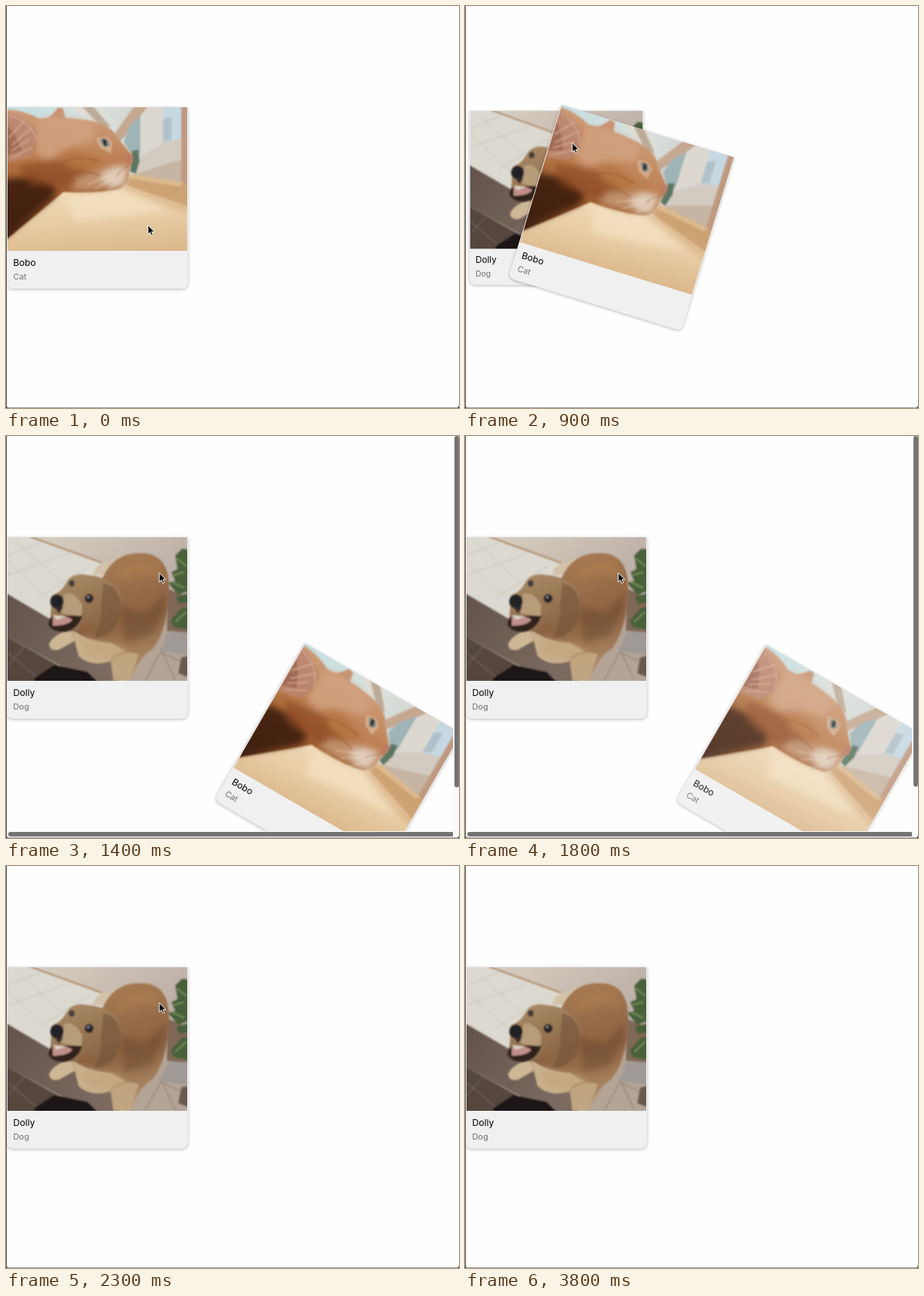
Write an HTML page that moves like this. It is 600 by 532 pixels and loops after 3.9 s.

```html
<!DOCTYPE html>
<html lang="en">
<head>
<meta charset="utf-8">
<title>Swipe cards</title>
<style>
  html, body { margin: 0; width: 100%; height: 100%; overflow: hidden; background: #fefefe; }
  #stage { position: relative; width: 600px; height: 532px; overflow: hidden; background: #fefefe; font-family: Inter, "Liberation Sans", sans-serif; }
  .card { position: absolute; left: 1px; top: 134px; width: 240px; height: 240px; background: #f0f0f0; border-radius: 1px 1px 8px 8px; box-shadow: 0 1px 4px rgba(0, 0, 0, .28); }
  .card svg { position: absolute; left: 1px; top: 0; width: 238px; height: 190px; }
  .card b, .card i { position: absolute; left: 8.5px; font-style: normal; font-weight: 400; white-space: nowrap; }
  .card b { top: 198px; font-size: 12.2px; line-height: 16px; color: #000; }
  .card i { top: 217px; font-size: 10.9px; line-height: 15px; color: #707070; }
  .track { position: absolute; background: #fafafa; }
  .thumb { position: absolute; background: #747474; border-radius: 3px; }
  #vTrack { right: 0; top: 0; width: 8px; height: 532px; }
  #hTrack { left: 1px; bottom: 1px; width: 599px; height: 8px; }
  #vThumb { left: 1.5px; top: 0; width: 6px; }
  #hThumb { left: 2px; top: 1px; height: 6px; }
  #cursor { position: absolute; left: -1px; top: -1px; overflow: visible; }
  #edge { position: absolute; inset: 0; border: solid #4c4c4c; border-width: 0 0 1px 1px; border-bottom-color: #a0a0a0; border-radius: 0 0 4px 4px; box-shadow: 0 0 0 4px #222; }
</style>
</head>
<body>
<div id="stage">
  <div class="card" id="dog">
    <svg viewBox="2 134 238 190" preserveAspectRatio="none">
      <defs>
        <filter id="soft" x="-20%" y="-20%" width="140%" height="140%"><feGaussianBlur stdDeviation="4"/></filter>
        <filter id="fine" x="-20%" y="-20%" width="140%" height="140%"><feGaussianBlur stdDeviation="1"/></filter>
        <linearGradient id="wall" x2="1" y2=".5"><stop stop-color="#d9cfc2"/><stop offset="1" stop-color="#bcaea6"/></linearGradient>
        <linearGradient id="step" x2="1" y2=".6"><stop stop-color="#62534b"/><stop offset="1" stop-color="#7b6a60"/></linearGradient>
        <linearGradient id="coat" x1=".3" x2=".5" y2="1"><stop stop-color="#a97d55"/><stop offset=".55" stop-color="#8c6242"/><stop offset="1" stop-color="#b4926d"/></linearGradient>
        <linearGradient id="face" y2="1" x2=".4"><stop stop-color="#ac8d68"/><stop offset="1" stop-color="#886443"/></linearGradient>
      </defs>
      <path fill="#dcd9d0" d="M2 134H240V324H2Z"/>
      <g filter="url(#fine)">
        <path fill="url(#wall)" d="M32 130H244V215L215 205L125 166Z"/>
        <path fill="none" stroke="#b39372" stroke-width="2.5" d="M32 133L128 168"/>
        <path fill="none" stroke="#c6c2b7" d="M2 158L45 141M2 184L82 156M42 214L110 172M15 141L75 195M2 165L55 215"/>
        <path fill="url(#step)" d="M-2 207L58 242L150 275V326H112L-2 264Z"/>
        <path fill="#54463e" d="M-2 264L70 304L45 328H-2Z"/>
        <path fill="none" stroke="#80716a" d="M0 285L40 318M25 278L2 304"/>
        <path fill="#1c1917" d="M38 320L64 303L108 312L124 328H36Z"/>
        <path fill="#b3a496" d="M155 328L190 270L208 210L244 220V328Z"/>
        <path fill="none" stroke="#857568" d="M184 324L205 286L240 302M204 280L224 322"/>
        <path fill="#a09a97" d="M213 261L244 255V290L205 285Z"/>
        <path fill="#695a50" d="M232 293L244 290V320L228 314Z"/>
        <path fill="#806756" d="M214 202L244 214V260L213 258Z"/>
        <path fill="#48603b" d="M224 158L233 149L244 150V205L228 210L214 194L224 192L219 180L227 176ZM225 213L244 207V220L229 222ZM218 244L232 228L244 225V257L222 253Z"/>
        <path fill="none" stroke="#748e58" stroke-width="2" d="M226 162L239 172M222 184L236 180M219 193L236 201M224 246L238 233"/>
      </g>
      <g filter="url(#fine)">
        <path fill="#d3c1a8" d="M116 184Q117 169 136 167L153 158L148 184Z"/>
        <path fill="url(#coat)" d="M126 192C137 165 154 154 179 155C206 155 217 174 216 205C215 239 207 266 194 282Q176 293 165 322L143 325L138 298Q115 307 97 292L88 265Z"/>
        <path fill="#cdb795" d="M87 255Q61 263 57 276Q58 285 70 283L91 271Z"/>
        <path fill="#c9b08c" d="M88 257Q111 273 139 274L158 285Q140 289 138 298Q111 306 96 291Z"/>
        <path fill="#bfa580" d="M139 296Q158 282 176 289L164 324H142Z"/>
      </g>
      <g filter="url(#soft)">
        <path fill="#ac7c51" opacity=".7" d="M145 182Q167 160 199 168L205 187Q175 177 151 193Z"/>
        <path fill="#68462f" opacity=".5" d="M147 225Q161 246 155 273L192 264Q210 238 211 206L187 235Z"/>
        <path fill="#c1a27c" opacity=".6" d="M100 268L150 276L168 292L135 296L104 290Z"/>
      </g>
      <g filter="url(#fine)">
        <path fill="url(#face)" d="M80 194Q88 180 107 184Q139 186 151 207Q156 230 147 252Q133 270 117 266Q118 249 107 247L86 259L58 253L61 211Q73 207 80 194Z"/>
        <path fill="#775439" opacity=".6" d="M129 195Q151 199 152 227Q153 250 131 263L117 267Q128 242 126 225Z"/>
        <path fill="#b89d7a" d="M77 209Q91 205 101 224L100 239L74 235Z"/>
        <path fill="#30221f" d="M59 240Q75 237 101 238Q96 255 79 259Q61 260 56 249Z"/>
        <path fill="#c0908a" d="M62 240Q75 235 88 243Q82 251 62 251Z"/>
        <path fill="#ddd3c5" d="M62 237L80 239L67 243Z"/>
        <ellipse cx="67.5" cy="219" rx="9" ry="9.5" fill="#242126"/>
        <path fill="#302a2b" d="M64 226L76 226L70 235Z"/>
        <ellipse cx="87" cy="195" rx="4" ry="4.5" fill="#473e3c"/>
        <ellipse cx="110" cy="215" rx="6" ry="6" fill="#292629"/>
        <circle cx="109" cy="213" r="1.5" fill="#9a9da3"/>
      </g>
    </svg>
    <b>Dolly</b><i>Dog</i>
  </div>

  <div class="card" id="cat">
    <svg viewBox="2 134 238 190" preserveAspectRatio="none">
      <defs>
        <linearGradient id="sill" x1=".4" x2=".6" y2="1"><stop stop-color="#f0dcba"/><stop offset=".5" stop-color="#e8cda5"/><stop offset="1" stop-color="#dcb88d"/></linearGradient>
        <linearGradient id="fur" x1=".4" x2=".3" y2="1"><stop stop-color="#cf9f7d"/><stop offset=".4" stop-color="#b97a4a"/><stop offset=".7" stop-color="#8e4e22"/><stop offset="1" stop-color="#422014"/></linearGradient>
        <linearGradient id="light" x2="1"><stop stop-color="#c3dde1"/><stop offset=".5" stop-color="#dbe1dd"/><stop offset="1" stop-color="#c8c6c0"/></linearGradient>
      </defs>
      <path fill="url(#light)" d="M2 134H240V324H2Z"/>
      <g filter="url(#fine)">
        <path fill="#e2ddd3" d="M81 130H116L139 157L120 154Z"/>
        <path fill="#bcab99" d="M98 130H113L139 160H126Z"/>
        <path fill="#c4a88f" d="M172 130H190L151 180L143 170Z"/>
        <path fill="#9fb4b6" d="M163 160L178 145V195L168 199L156 180Z"/>
        <path fill="#dcd8d0" d="M178 146L190 130H208V182L178 201Z"/>
        <path fill="#c6d8e2" d="M208 130H232V175L208 181Z"/>
        <path fill="#b0c1c9" d="M208 150L219 146V176L208 180Z"/>
        <path fill="#d3cbc1" d="M173 202L207 182L233 175V208L174 223Z"/>
        <path fill="#c7b5a3" d="M172 222L233 203V238L165 226Z"/>
        <path fill="#bf9a80" d="M232 130H244V240L232 234Z"/>
        <path fill="#5b7660" d="M167 192L175 190L177 205L172 222L164 219Z"/>
        <path fill="#cda273" d="M158 222L244 236V267L155 238Z"/>
        <path fill="#dcb98d" d="M163 222L236 234L230 239L160 228Z"/>
        <path fill="url(#sill)" d="M72 244L153 235L244 266V328H-2V304Z"/>
      </g>
      <g filter="url(#soft)">
        <path fill="#d2a677" opacity=".6" d="M158 233L244 262V275L153 241Z"/>
        <path fill="#f5e5c7" opacity=".6" d="M80 250L149 243L215 272L90 285Z"/>
      </g>
      <g filter="url(#fine)">
        <path fill="#c89473" d="M51 152Q64 142 69 134L76 136L79 152Z"/>
        <path fill="url(#fur)" d="M-2 137Q22 137 44 149Q75 146 105 151Q138 154 148 175L166 196Q170 204 164 213Q162 238 149 242Q122 248 76 246Q38 278 -2 311Z"/>
      </g>
      <g filter="url(#soft)">
        <path fill="#401c12" d="M-6 230L34 226L66 239L62 254L-6 309Z" opacity=".9"/>
        <path fill="#8f4b22" opacity=".7" d="M15 211L65 203L113 219L86 239L32 235Z"/>
        <path fill="#d2a483" opacity=".8" d="M42 151Q86 145 116 156L117 179Q78 184 59 203L39 196Z"/>
        <path fill="#b5733f" opacity=".7" d="M72 194Q92 186 122 203L126 224L85 216Z"/>
        <path fill="#c0906a" d="M93 228Q117 218 137 211L160 213L156 239Q122 246 86 243Z"/>
        <path fill="#dfc9b5" d="M124 228Q138 208 161 212L159 236L142 242Z"/>
      </g>
      <g filter="url(#fine)">
        <path fill="#bb8670" opacity=".8" d="M2 141Q24 147 39 163Q45 184 31 201L2 207Z"/>
        <path fill="#8a5244" opacity=".5" d="M2 158Q14 171 21 191L2 197Z"/>
        <path fill="none" stroke="#d9b199" stroke-width="1.2" d="M3 144Q35 154 40 178M4 174L25 151M8 184L34 161M7 192L32 176M8 201L35 187"/>
        <path fill="none" stroke="#8d5530" stroke-width="1.4" opacity=".6" d="M63 222Q91 213 125 224M70 210Q89 196 123 205M52 233Q76 235 91 232"/>
        <path fill="#d3ac8b" d="M119 176Q133 168 141 181L139 195L125 188Z"/>
        <path fill="#788e91" d="M124 177Q134 172 138 184L130 187Z"/>
        <path fill="#332e2b" d="M128 175L133 177L134 186L129 184Z"/>
        <path fill="#b97c65" d="M158 197L167 196Q170 205 163 211Z"/>
        <path fill="none" stroke="#9c6d55" d="M161 212Q151 217 147 225"/>
        <path fill="none" stroke="#efe2d5" stroke-width=".7" d="M144 222L108 236M145 226L118 242M149 231L132 248"/>
      </g>
    </svg>
    <b>Bobo</b><i>Cat</i>
  </div>

  <div class="track" id="hTrack"><div class="thumb" id="hThumb"></div></div>
  <div class="track" id="vTrack"><div class="thumb" id="vThumb"></div></div>
  <svg id="cursor" width="12" height="17" viewBox="-1 -1 12 17">
    <path d="M0 0V12.2L2.8 9.7L4.6 13.8L6.7 12.9L4.9 8.9H8.7Z" fill="#000" stroke="#fff" stroke-width="1"/>
  </svg>
  <div id="edge"></div>
</div>
<script>
const LOOP = 3900, TICK = 100, W = 600, H = 532;

// Each track: [ms, value] pairs, linear between them
const tracks = {
  x: [[0, 188], [200, 160], [400, 96], [600, 62], [700, 62], [800, 88], [900, 142], [1000, 194], [1100, 203], [2400, 203], [2500, 210], [2900, 325]],
  y: [[0, 290], [200, 327], [400, 235], [600, 181], [2400, 181], [2500, 170], [2900, 7]],
  slide: [[700, 0], [800, 26], [900, 90], [1000, 225], [1100, 348], [1200, 361], [1400, 368], [1800, 371.5], [2000, 372]],
  turn: [[700, 0], [800, 5], [900, 17], [1000, 28], [1100, 30]],
  fade: [[1600, 1], [1800, .87], [1900, .45], [2000, 0]],
  grow: [[700, .9], [800, .92], [1000, 1], [1100, 1.017], [1200, 1]]
};

const $ = id => document.getElementById(id);
const [cat, dog, cursor, vTrack, hTrack, vThumb, hThumb] =
  ['cat', 'dog', 'cursor', 'vTrack', 'hTrack', 'vThumb', 'hThumb'].map($);

function at(name, t) {
  const keys = tracks[name];
  const i = keys.findIndex(k => k[0] > t);
  if (i === 0) return keys[0][1];
  if (i < 0) return keys[keys.length - 1][1];
  const [t0, a] = keys[i - 1], [t1, b] = keys[i];
  return a + (b - a) * (t - t0) / (t1 - t0);
}

const show = (el, on) => { el.style.visibility = on ? 'visible' : 'hidden'; };

function draw(t) {
  const slide = at('slide', t), turn = at('turn', t), fade = at('fade', t);
  cat.style.transform = `rotate(${turn}deg) translateX(${slide}px)`;
  cat.style.opacity = fade;
  dog.style.transform = `scale(${at('grow', t)})`;

  // Scroll bars follow how far the turned card sticks out
  const c = Math.cos(turn * Math.PI / 180), s = Math.sin(turn * Math.PI / 180);
  const reach = 120 * (c + s);
  const right = 121 + slide * c + reach, bottom = 254 + slide * s + reach;
  show(vTrack, fade > 0 && bottom > H);
  show(hTrack, fade > 0 && right > W);
  vThumb.style.height = H * H / bottom - 5 + 'px';
  hThumb.style.width = W * W / right - 3 + 'px';
  // A child with its own visibility would ignore the track, so only the tracks are toggled

  cursor.style.transform = `translate(${at('x', t)}px, ${at('y', t)}px)`;
  show(cursor, t < 3000);
}

const start = performance.now();
function frame() {
  const t = (performance.now() - start) % LOOP;
  draw(Math.floor(t / TICK) * TICK);
  requestAnimationFrame(frame);
}
frame();
</script>
</body>
</html>
```
